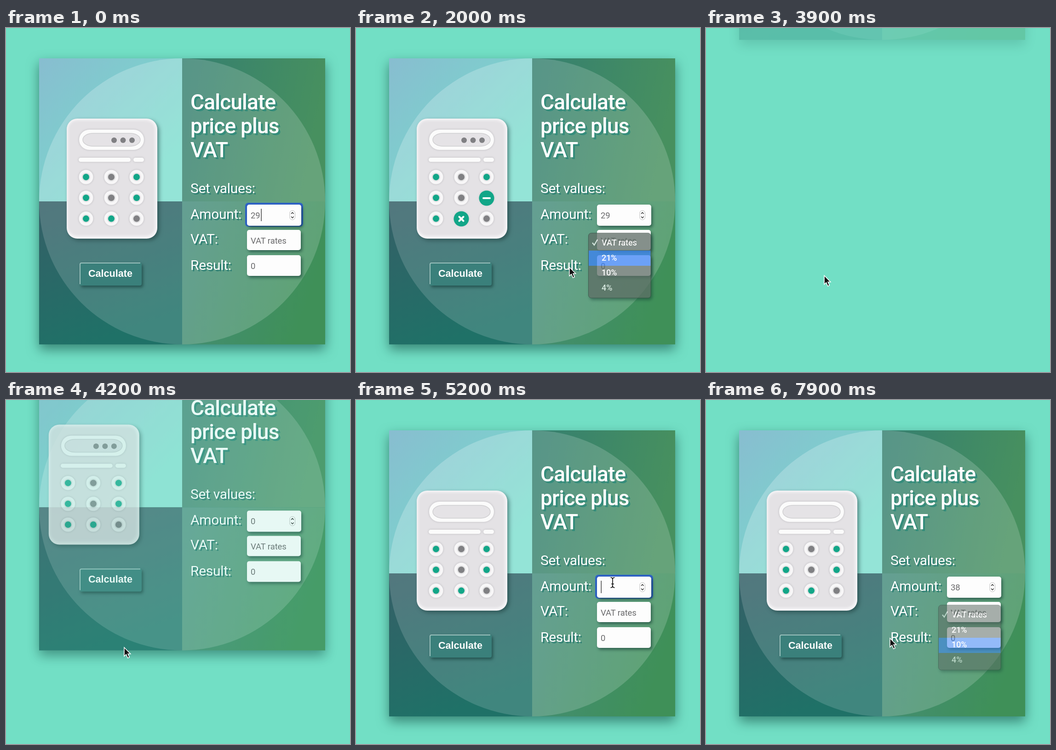
An HTML page for the animation above (8 s loop, 748 by 748 pixels).

```html
<!DOCTYPE html>
<html lang="en">
<head>
<meta charset="utf-8">
<title>Price plus VAT</title>
<style>
  html, body { margin: 0; width: 100%; height: 100%; overflow: hidden; background: #72dfc5; }
  svg { display: block; width: 100vw; height: 100vh; }
  text { font-family: Roboto, "Open Sans", sans-serif; white-space: pre; }
  .title { font-size: 46px; font-weight: 500; letter-spacing: -.85px; fill: #fff; filter: drop-shadow(4px 4px 0 #348c7b); }
  .label { font-size: 30px; letter-spacing: -.3px; fill: #fff; filter: drop-shadow(3px 3px 0 #2b7d72); }
  .value { font-size: 18.5px; letter-spacing: -.1px; fill: #6a6a6c; }
  .option { font-size: 18px; font-weight: 500; letter-spacing: -.1px; fill: #fff; }
  .button { font: bold 21.6px "Liberation Sans", Arial, sans-serif; fill: #fff; }
  .card { filter: drop-shadow(0 11px 13px rgba(10, 60, 52, .55)); }
  .raised { filter: drop-shadow(4px 4px 4px rgba(20, 50, 50, .5)); }
  .field { filter: drop-shadow(3px 4px 3px rgba(10, 45, 42, .55)); }
  .key { filter: drop-shadow(0 0 2px rgba(110, 110, 115, .35)); }
  .glow { filter: blur(2px); }
</style>
</head>
<body>
<svg id="stage" viewBox="0 0 748 748"><defs id="defs"></defs></svg>
<script>
const LOOP = 8000, RELOAD = 3800, SETTLE = 700;
const GREEN = '#12a688', GRAY = '#808083';
const stage = document.getElementById('stage');
const defs = document.getElementById('defs');

function add(parent, tag, attrs = {}, content = '') {
  const node = document.createElementNS('http://www.w3.org/2000/svg', tag);
  for (const name in attrs) node.setAttribute(name, attrs[name]);
  node.textContent = content;
  parent.append(node);
  return node;
}
const group = (parent, attrs) => add(parent, 'g', attrs);
const rect = (parent, x, y, width, height, rx, attrs) =>
  add(parent, 'rect', { x, y, width, height, rx, ...attrs });
const circle = (parent, cx, cy, r, attrs) => add(parent, 'circle', { cx, cy, r, ...attrs });
const path = (parent, d, attrs) => add(parent, 'path', { d, ...attrs });
const label = (parent, x, y, kind, content) => add(parent, 'text', { x, y, class: kind }, content);
const show = (node, opacity) => node.setAttribute('opacity', Number(opacity));

function gradient(id, from, to, x2 = 1, y2 = 1) {
  const node = add(defs, 'linearGradient', { id, x2, y2 });
  add(node, 'stop', { 'stop-color': from });
  add(node, 'stop', { offset: 1, 'stop-color': to });
  return `url(#${id})`;
}

// Card with four quadrants and a pale disc
const card = group(stage);
rect(card, 72, 66, 622, 622, 0, { fill: '#4b9080', class: 'card' });
[
  [72, 66, gradient('nw', '#88bdd0', '#76dccb', .8, .8), .22],
  [383, 66, gradient('ne', '#357f70', '#47905f', 1, .2), .17],
  [72, 377, gradient('sw', '#355f67', '#1f7167', .35, 1), .15],
  [383, 377, gradient('se', '#458c7d', '#3f9058', 1, .35), .17],
].forEach(([x, y, fill, alpha]) => {
  rect(card, x, y, 311, 311, 0, { fill });
  const left = x < 383, top = y < 377;
  path(card, `M383 377H${left ? 72 : 694}A311 311 0 0 ${left === top ? 1 : 0} 383 ${top ? 66 : 688}Z`,
    { fill: '#fff', 'fill-opacity': alpha });
});

['Calculate', 'price plus', 'VAT'].forEach((line, i) => label(card, 401, 177 + 52 * i, 'title', line));
[['Set values:', 359], ['Amount:', 415], ['VAT:', 469], ['Result:', 526]]
  .forEach(([word, y]) => label(card, 401, y, 'label', word));

// Form fields
const ring = rect(card, 520, 380, 126, 52, 7, { fill: '#2e62c6' });
const [amount, vat, result] = [[384, 118, 46], [439, 117, 44], [494, 117, 45]].map(([y, width, height]) => {
  rect(card, 524, y, width, height, 5, { fill: '#fdfdfd', class: 'field' });
  return label(card, 532, y + 29.5, 'value', '');
});
rect(card, 617, 397, 11.5, 20, 5.5, { fill: '#fff', stroke: '#bbb' });
path(card, 'M620 404l2.8-3 2.8 3M620 410l2.8 3 2.8-3', { fill: 'none', stroke: '#333', 'stroke-width': 1.5 });
const caret = rect(card, 0, 393, 1.5, 27, 0, { fill: '#444' });

// Button
const halo = path(card, 'M161 558V511H290', { fill: 'none', stroke: '#e4f3f0', 'stroke-width': 8, class: 'glow' });
const button = rect(card, 160, 510, 135, 50, 4, { class: 'field' });
const buttonEdge = path(card, 'M161 557V514Q161 511 164 511H292', { fill: 'none', stroke: '#b5d2cf', 'stroke-width': 2 });
label(card, 179, 541, 'button', 'Calculate');

// Calculator
const calculator = group(card);
rect(calculator, 132, 197, 197, 261, 23, { fill: '#f5f4f6', class: 'raised' });
rect(calculator, 135, 201, 189, 251, 20, { fill: '#e4e2e5', class: 'glow' });
function groove(x, y, width, height, border) {
  rect(calculator, x, y, width, height, height / 2, { fill: '#fbfbfb', class: 'key' });
  if (border) rect(calculator, x + border, y + border, width - 2 * border, height - 2 * border, height / 2,
    { fill: '#e5e3e6', stroke: '#d0cfd1', 'stroke-width': 1.5 });
}
groove(159, 221, 141, 44, 8);
groove(158, 282, 113, 9);
groove(277, 282, 23, 9);
const dots = [235, 254.5, 274].map(x => circle(calculator, x, 244, 6, { fill: GRAY }));

const grayKeys = [1, 4, 8];
for (let i = 0; i < 9; i++) {
  const x = 174 + 55 * (i % 3), y = 324 + 45.3 * Math.floor(i / 3);
  circle(calculator, x, y, 15.5, { fill: '#f8f7f8', class: 'key' });
  circle(calculator, x, y, 9.5, { fill: '#e2e2e3' });
  circle(calculator, x, y, 7, { fill: grayKeys.includes(i) ? GRAY : GREEN });
}
function litKey(x, y, color, sign) {
  const node = group(calculator, { transform: `translate(${x} ${y})` });
  circle(node, 0, 0, 16.5, { fill: color });
  path(node, sign, { stroke: '#fff', 'stroke-width': 4, 'stroke-linecap': 'round' });
  return node;
}
const plus = litKey(174, 324, GRAY, 'M-6 0H6M0-6V6');
const minus = litKey(284, 370, GREEN, 'M-7 0H7');
const times = litKey(229, 415, GREEN, 'M-4.5-4.5L4.5 4.5M4.5-4.5L-4.5 4.5');

// Drop-down menu
const menu = group(stage);
rect(menu, 505.5, 446, 135.5, 141, 6, { fill: '#5d6c65', stroke: '#35453f', class: 'field' });
const highlight = rect(menu, 506, 0, 134.5, 33, 0, { fill: '#3b82f6' });
['VAT rates', '21%', '10%', '4%'].forEach((name, i) => label(menu, 534, 473 + 32.7 * i, 'option', name));
path(menu, 'M514 467l4 5 7-12', { fill: 'none', stroke: '#fff', 'stroke-width': 2.3 });

// Mouse pointers, each with its hot spot at 0,0
const arrow = path(stage, 'M0 0V19L4.3 15.2 7.8 23 11.3 21.4 8 14H13.7Z',
  { fill: '#111', stroke: '#fff', 'stroke-width': 1.5 });
const hand = path(stage,
  'M-2 2Q0-1 2 2L4 9Q6 7 7.5 9Q9.5 7.5 11 10Q13.5 9 14 12V18L12 23H3L-3 16Q-4.5 13-1 14L1 15Z',
  { fill: '#fff', stroke: '#111', 'stroke-width': 1.5 });
const beam = group(stage);
for (const [stroke, width] of [['#fff', 4], ['#111', 1.7]])
  path(beam, 'M-4.5-11Q0-11 0-7V7Q0 11-4.5 11M4.5-11Q0-11 0-7V7Q0 11 4.5 11M-3 3H3',
    { fill: 'none', stroke, 'stroke-width': width });

const route = [
  [700, 580, 410], [1150, 562, 458], [1400, 562, 462], [1650, 545, 500], [1850, 545, 500],
  [2000, 464, 520], [2550, 258, 541], [4200, 257, 538], [4450, 257, 538], [5000, 558, 397],
  [6150, 558, 397], [6500, 562, 452], [6900, 562, 453], [7250, 560, 500], [7500, 560, 531],
  [7740, 560, 531], [7900, 400, 518], [8000, 380, 514],
];
const clamp = v => Math.max(0, Math.min(1, v));
const smooth = v => v * v * (3 - 2 * v);
const within = (v, from, to) => v >= from && v < to;
// Fades in and out around a time span
const pulse = (v, from, to) => clamp((v - from) / 120) * clamp((to - v) / 120);

function pointerAt(t) {
  const next = Math.max(1, route.findIndex(stop => stop[0] > t));
  const [t0, x0, y0] = route[next - 1], [t1, x1, y1] = route[next];
  const k = smooth(clamp((t - t0) / (t1 - t0)));
  return [x0 + (x1 - x0) * k, y0 + (y1 - y0) * k];
}

function drawPointer(t, drop, menuOpen) {
  const [x, y] = pointerAt(t);
  const visible = t >= 700 && !within(t, 5450, 6150);
  const cardY = y - drop;
  const overButton = t > 2200 && within(x, 160, 295) && within(cardY, 510, 560);
  const overAmount = !menuOpen && within(x, 524, 642) && within(cardY, 384, 430);
  for (const node of [arrow, hand, beam]) node.setAttribute('transform', `translate(${x} ${y})`);
  show(hand, visible && overButton);
  show(beam, visible && overAmount);
  show(arrow, visible && !overButton && !overAmount);
  show(halo, overButton ? .8 : 0);
  show(buttonEdge, overButton ? 0 : .8);
  button.setAttribute('fill', overButton ? '#2c7973' : '#3a807b');
}

function drawForm(t) {
  const fresh = t >= RELOAD;
  amount.textContent = !fresh ? '29' : t < 5050 ? '0' : t < 5600 ? '' : t < 5850 ? '3' : '38';
  vat.textContent = within(t, 2150, RELOAD) ? '21%' : 'VAT rates';
  result.textContent = within(t, 2800, RELOAD) ? '35.09' : '0';
  const focused = t < 1250 || within(t, 5050, 6450);
  show(ring, focused);
  const blink = within(t, 5500, 6100) || (fresh ? t - 5050 : t) % 1000 < 500;
  show(caret, focused && blink);
  caret.setAttribute('x', 532.5 + 10.7 * amount.textContent.length + (amount.textContent ? .5 : 0));
}

function drawMenu(t) {
  const first = t < RELOAD;
  const open = first ? within(t, 1300, 2150) : t >= 6600;
  const fade = first ? (2150 - t) / 200 : (8020 - t) / 220;
  show(menu, open ? clamp(fade) : 0);
  const row = first ? Number(t >= 1560) : (t >= 7150) + (t >= 7390);
  highlight.setAttribute('y', 451 + 33 * row);
  return open;
}

function drawCalculator(t) {
  const phase = (t < RELOAD ? t + 100 : Math.max(0, t - 4000)) % 2700;
  show(plus, pulse(phase, 320, 900));
  show(minus, pulse(phase, 1600, 2350));
  show(times, pulse(phase, 1800, 2450));
  dots.forEach((dot, i) => show(dot, !within(phase, 980, 1280 + 80 * i)));
}

function draw(t) {
  const left = t < RELOAD ? 0 : 1 - clamp((t - RELOAD) / SETTLE);
  const away = left ** 2.2, slide = left ** 1.9;
  const drop = -933 * away;
  card.setAttribute('transform', `translate(0 ${drop})`);
  show(card, 1 - away);
  calculator.setAttribute('transform', `translate(${-197 * slide} 0)`);
  show(calculator, 1 - slide);
  drawForm(t);
  drawCalculator(t);
  drawPointer(t, drop, drawMenu(t));
}

const start = performance.now();
function tick() {
  draw((performance.now() - start) % LOOP);
  requestAnimationFrame(tick);
}
tick();
</script>
</body>
</html>
```
